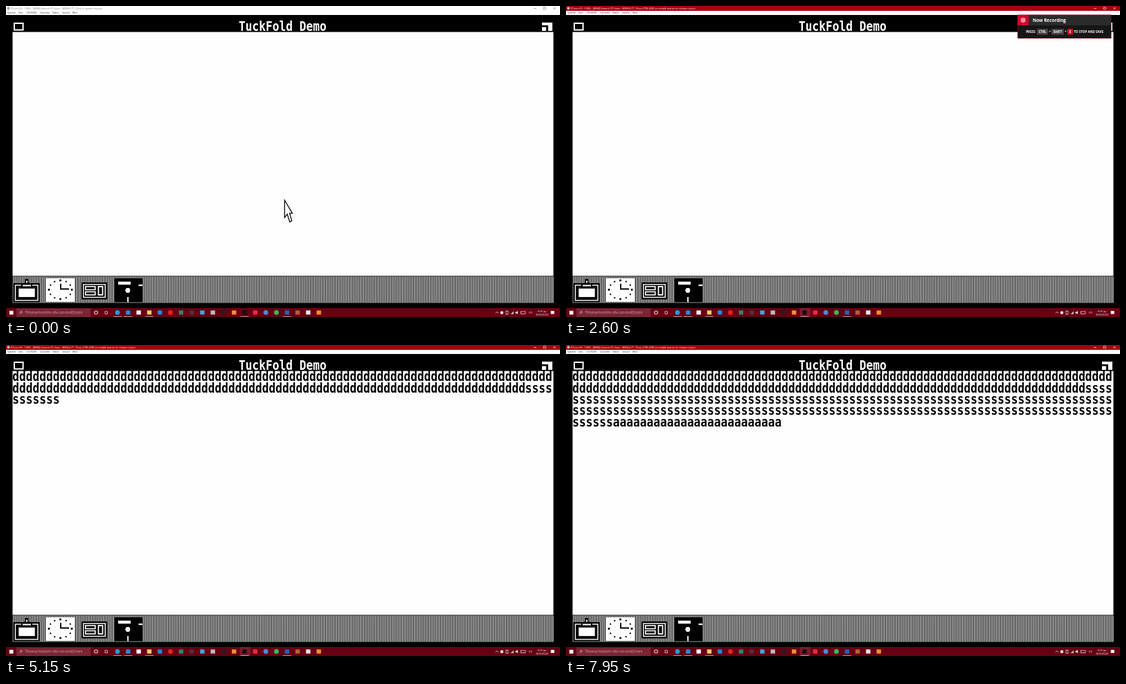
These frames come from a looping animation (800 by 450 pixels, 8000 ms). An HTML page with a canvas:

```html
<!DOCTYPE html>
<html lang="en">
<head>
<meta charset="utf-8">
<title>Desktop recording</title>
<style>
html, body { margin: 0; width: 100%; height: 100%; overflow: hidden; background: #000; }
canvas { display: block; width: 800px; height: 450px; }
</style>
</head>
<body>
<canvas id="stage" width="800" height="450"></canvas>
<script>
const ctx = document.getElementById('stage').getContext('2d');
const LOOP = 8000, STEP = 50, COLUMNS = 80;
const UI = '"Open Sans", "Noto Sans", sans-serif';
const MONO = 'bold 16.2px "DejaVu Sans Mono", monospace';
const PIXEL_ASPECT = 1.21;
const TYPED = 'd'.repeat(156) + 's'.repeat(170) + 'a'.repeat(60);
const TYPING = [[2600, 0], [3450, 56], [4450, 121], [5150, 167], [6450, 254], [7950, 351], [8000, 354]];

function rect(x, y, w, h, color) {
  ctx.fillStyle = color;
  ctx.fillRect(x, y, w, h);
}

function disc(x, y, r, color) {
  ctx.fillStyle = color;
  ctx.beginPath();
  ctx.arc(x, y, r, 0, 7);
  ctx.fill();
}

function line(points, color, width = 1) {
  ctx.strokeStyle = color;
  ctx.lineWidth = width;
  ctx.beginPath();
  points.forEach(([x, y]) => ctx.lineTo(x, y));
  ctx.stroke();
}

function polygon(points, fill, stroke, width) {
  ctx.beginPath();
  points.forEach(([x, y]) => ctx.lineTo(x, y));
  ctx.closePath();
  ctx.fillStyle = fill;
  ctx.fill();
  if (!stroke) return;
  ctx.strokeStyle = stroke;
  ctx.lineWidth = width;
  ctx.stroke();
}

function box(x, y, w, h, color, width) {
  ctx.strokeStyle = color;
  ctx.lineWidth = width;
  ctx.strokeRect(x, y, w, h);
}

function label(text, x, y, size, color, weight = 400, align = 'left') {
  ctx.font = `${weight} ${size}px ${UI}`;
  ctx.textAlign = align;
  ctx.fillStyle = color;
  ctx.fillText(text, x, y);
}

// The emulated screen has tall pixels.
function screenText(text, x, y, color, align = 'left') {
  ctx.save();
  ctx.translate(x, y);
  ctx.scale(1, PIXEL_ASPECT);
  ctx.font = MONO;
  ctx.textAlign = align;
  ctx.fillStyle = color;
  ctx.fillText(text, 0, 0);
  ctx.restore();
}

function along(points, t) {
  if (t <= points[0][0]) return points[0][1];
  for (let i = 1; i < points.length; i++) {
    const [t0, a] = points[i - 1], [t1, b] = points[i];
    if (t <= t1) return a + (b - a) * (t - t0) / (t1 - t0);
  }
  return points[points.length - 1][1];
}

function drawWindowFrame(t) {
  const active = t >= 1250;
  const ink = active ? '#fff' : '#777';
  const speed = t >= 6200 && t < 7000 ? 101 : 100;
  const hint = t < 1750 ? 'Click to capture mouse'
    : 'Press CTRL-END or middle button to release mouse';
  rect(0, 0, 800, 7, active ? '#a8000e' : '#fff');
  rect(1.8, 1.5, 3.4, 3.6, active ? '#c9b6b8' : '#999');
  label(`PCem v16 - ${speed}% - [8088] Generic XT clone - 8088/4.77 - ${hint}`, 7, 4.7, 3.6, ink);
  line([[762, 3.5], [766, 3.5]], ink, 0.6);
  box(776.5, 1.8, 3, 3, ink, 0.6);
  line([[790.5, 1.8], [793.7, 5]], ink, 0.6);
  line([[793.7, 1.8], [790.5, 5]], ink, 0.6);
  rect(0, 7, 800, 6, '#fff');
  const menu = { System: 2, Disc: 18, 'CD-ROM': 29.5, Cassette: 49, Video: 67, Sound: 81, Misc: 96 };
  for (const name in menu) label(name, menu[name], 11.3, 3.6, '#333');
}

function drawScreen() {
  rect(0, 13, 800, 424, '#000');
  rect(9.5, 37.6, 781, 352.9, '#fefefe');
  screenText('TuckFold Demo', 399.3, 35.8, '#fff', 'center');
  box(12, 25, 12.6, 9.6, '#fff', 2);
  rect(774, 24, 15, 12, '#fff');
  rect(774, 28, 9, 8, '#000');
  rect(774, 30.5, 6, 5.5, '#fff');

  rect(9.5, 391.5, 781, 38, '#d6d6d6');
  for (let x = 9.5; x < 790; x += 2.44) rect(x, 391.5, 1.22, 38, '#1c1c1c');
  drawClipboard();
  drawClock();
  drawCard();
  drawDisk();
}

function drawClipboard() {
  rect(11, 401, 37.5, 27.5, '#000');
  box(13.5, 404, 32.5, 22, '#fff', 1.4);
  rect(17.5, 407, 25, 14.5, '#fff');
  polygon([[27.5, 395], [32.5, 395], [32.5, 400], [38, 403], [38, 408], [22, 408], [22, 403], [27.5, 400]], '#000');
  rect(29, 397.5, 2, 3, '#fff');
  rect(24, 403.5, 12, 2, '#fff');
  box(17.5, 408, 25, 14, '#000', 1.6);
}

function drawClock() {
  rect(58, 394, 41, 34, '#fff');
  for (let i = 0; i < 12; i++) {
    const a = i * Math.PI / 6;
    const size = i % 3 ? 2 : 2.7;
    rect(78.5 + 16.5 * Math.cos(a) - size / 2, 410.5 + 13.5 * Math.sin(a) - size / 2, size, size, '#000');
  }
  line([[79, 402], [79, 409.5], [91, 409.5]], '#000', 1.8);
}

function drawCard() {
  rect(109, 400, 37, 24.5, '#000');
  box(111.8, 403, 31.5, 18.5, '#fff', 1.4);
  box(114.8, 406, 14, 4.5, '#fff', 1.6);
  box(114.8, 413.5, 14, 4.5, '#fff', 1.6);
  box(133.5, 406, 6, 12, '#fff', 1.8);
}

function drawDisk() {
  rect(157, 394, 40, 34.5, '#000');
  rect(162, 398.8, 18, 4.4, '#fff');
  rect(191.5, 403, 5.5, 2.2, '#fff');
  polygon([[174, 408], [178, 408], [179.5, 411.5], [178, 415], [174, 415], [172, 411.5]], '#fff');
  rect(175.2, 421, 1.8, 7.5, '#fff');
}

function drawTyping(t) {
  const shown = TYPED.slice(0, Math.floor(along(TYPING, t) + 1e-6));
  for (let i = 0; i * COLUMNS < shown.length; i++) {
    screenText(shown.slice(i * COLUMNS, (i + 1) * COLUMNS), 9.2, 52.2 + i * 16.4, '#000');
  }
}

function arrow(x, y, sx, sy, fill, stroke, width) {
  const shape = [[0, 0], [0, 12], [3, 9.6], [6, 15], [8.3, 14.2], [5.8, 9], [9, 9]];
  polygon(shape.map(([px, py]) => [x + px * sx, y + py * sy]), fill, stroke, width);
}

function drawPointers(t) {
  if (t < 2600) arrow(402.3, 281, 1.25, 2.1, '#fff', '#000', 1.25);
  if (t >= 1250 && t < 1750) {
    const x = along([[1250, 345], [1600, 478.5]], t);
    const y = along([[1250, 443], [1600, 310.5]], t);
    arrow(x, y, 0.28, 0.31, '#000', '#444', 0.4);
  }
}

function drawToast() {
  rect(652, 12.5, 135.5, 34.5, '#7d0b20');
  rect(652.7, 13, 134.2, 33.2, '#161616');
  rect(652.7, 13, 134.2, 15, '#2b2b2b');
  rect(652, 13, 16, 15, '#cf0a2c');
  disc(660, 20.5, 3.2, '#fff');
  disc(660, 20.5, 2.3, '#cf0a2c');
  disc(660, 20.5, 1.2, '#fff');
  label('Now Recording', 674, 23, 6.4, '#fff', 700);
  const hint = (text, x) => label(text, x, 38.8, 4.6, '#fff', 700, 'center');
  rect(680, 33, 16, 8.5, '#444');
  rect(701, 33, 18, 8.5, '#444');
  rect(724, 33, 8, 8.5, '#cf0a2c');
  hint('PRESS', 671);
  hint('CTRL', 688);
  hint('+', 698.7);
  hint('SHIFT', 710);
  hint('+', 721.5);
  hint('E', 728);
  hint('TO STOP AND SAVE', 754.7);
}

function drawTaskbar(t) {
  rect(0, 437, 800, 13, '#650013');
  rect(5, 441, 5.5, 5.5, '#fff');
  rect(15, 437.5, 107.5, 12.5, '#7b2434');
  ctx.strokeStyle = '#ddd';
  ctx.lineWidth = 0.6;
  ctx.beginPath();
  ctx.arc(22, 443, 1.4, 0, 7);
  ctx.stroke();
  line([[21, 444], [19.7, 445.5]], '#ddd', 0.6);
  label('Πληκτρολογήστε εδώ για αναζήτηση', 27.5, 445.3, 4.85, '#c9b3b8');
  disc(130, 443.5, 2.8, '#fff');
  disc(130, 443.5, 1.9, '#650013');
  box(143, 442, 3.6, 3.4, '#eee', 0.7);

  if (t >= 1750) rect(337.5, 437, 15.4, 13, '#7f1a2c');
  const apps = ['#2499d8', '#258bd2', '#f3f3f3', '#f4cd65', '#2388d8', '#df2323', '#36816c', '#50333a',
    '#45a4d8', '#b8bcc0', '#28191d', '#ef9139', '#111', '#e32f47', '#4e87d0', '#38b663',
    '#2862b5', '#ad623e', '#dce5df', '#f0912b'];
  apps.forEach((color, i) => {
    const x = 161 + i * 15.3;
    if ([0, 5, 14, 15].includes(i)) disc(x, 443.5, 3.4, color);
    else rect(x - 3.2, 440.5, 6.4, 6, color);
    if ([0, 1, 3, 12, 16].includes(i)) rect(x - 6, 449, 12, 1, '#d28b98');
  });

  line([[707, 444.7], [709, 442.5], [711, 444.7]], '#fff', 0.7);
  disc(716, 443.8, 2.2, '#eee');
  box(722, 441.3, 3, 4.8, '#eee', 0.7);
  for (let i = 0; i < 4; i++) rect(729 + i, 445 - i, 0.7, 1 + i, '#eee');
  polygon([[735.5, 442.7], [737, 442.7], [739, 441], [739, 446], [737, 444.5], [735.5, 444.5]], '#eee');
  box(743.5, 442, 6.5, 3.5, '#eee', 0.7);
  label('ΕΛ', 757.5, 445, 4, '#fff', 400, 'center');
  label('4:26 μμ', 774, 442.8, 3.8, '#fff', 400, 'center');
  label('30/6/2020', 774, 448.3, 3.8, '#fff', 400, 'center');
  rect(786.7, 441.2, 5, 4.4, '#fff');
}

function draw(t) {
  drawScreen();
  drawTyping(t);
  drawPointers(t);
  drawWindowFrame(t);
  drawTaskbar(t);
  if (t >= 500 && t < 4800) drawToast();
}

function tick() {
  const t = performance.now() % LOOP;
  draw(Math.floor(t / STEP) * STEP);
  requestAnimationFrame(tick);
}
tick();
</script>
</body>
</html>
```
